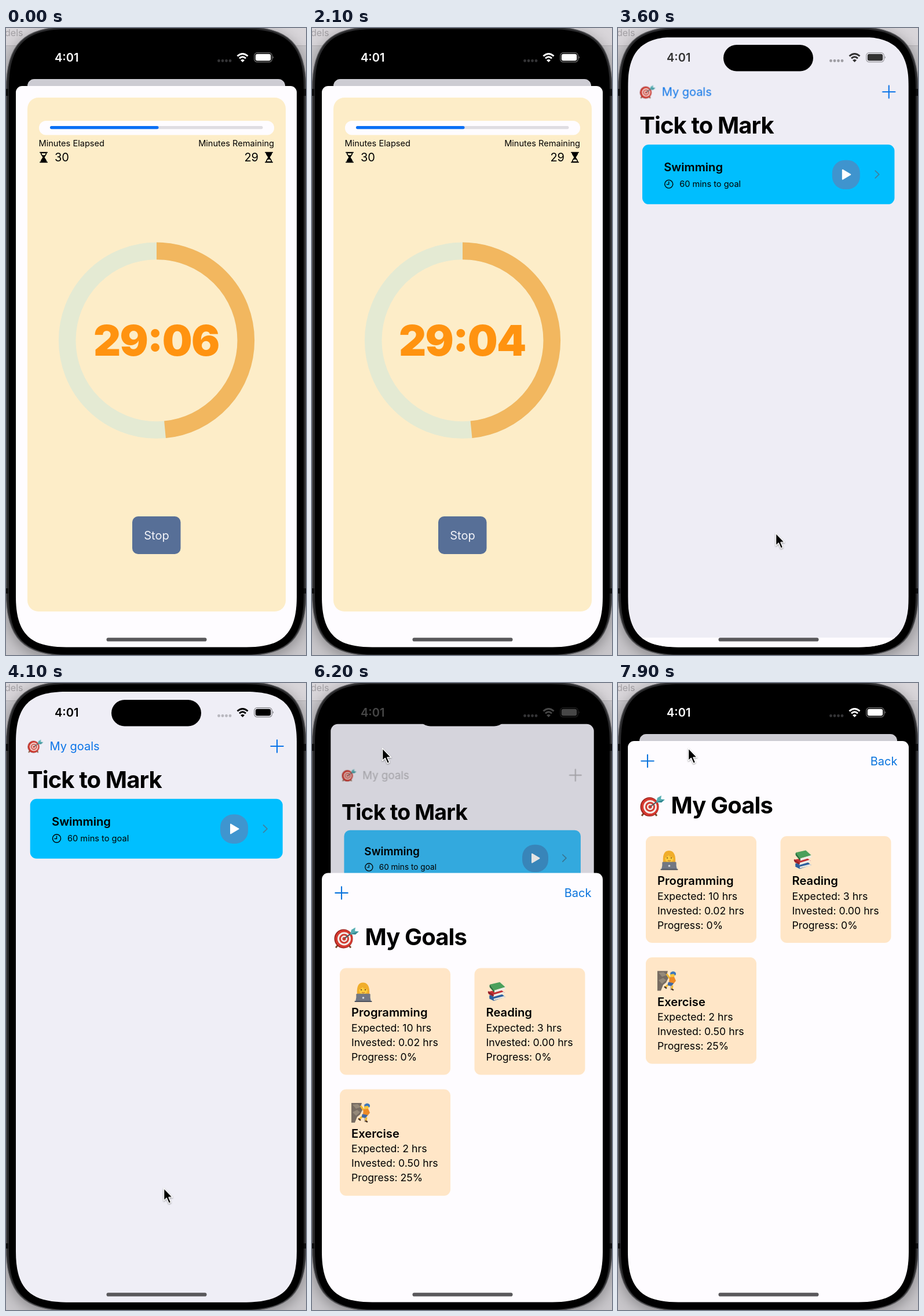
An HTML page that plays this animation: 518 px wide and 1081 px high, repeating every 8 s.

```html
<!DOCTYPE html>
<html lang="en">
<head>
<meta charset="utf-8">
<title>Goal timer</title>
<style>
/* --open: how far the sheet is up (0 to 1); --sec: last digit of the countdown */
@property --open { syntax: "<number>"; inherits: true; initial-value: 1; }
@property --sec { syntax: "<integer>"; inherits: true; initial-value: 6; }

html, body { margin: 0; width: 100%; height: 100%; overflow: hidden; background: #cfccd0; }
svg.stage {
  display: block; width: 518px; height: 1081px;
  font-family: Inter, "Liberation Sans", sans-serif;
  animation: open 8s infinite, count 8s infinite;
  /* critically damped spring for the sheet, hard steps for the digit */
  animation-timing-function:
    linear(0, .103 5%, .294 10%, .4815 15%, .6356 20%, .751 25%, .834 30%,
      .89 35%, .929 40%, .971 50%, .9928 65%, .9983 80%, 1),
    step-end;
}
@keyframes open {
  0%, 40.625% { --open: 1; }
  48.125%, 75.575% { --open: 0; }
  83.075%, 100% { --open: 1; }
}
@keyframes count {
  0% { --sec: 6; }
  8.75% { --sec: 5; }
  21.25% { --sec: 4; }
  33.75%, 100% { --sec: 3; }
}

.home {
  transform: translate(259.5px, calc(15px + 73px * var(--open)))
    scale(calc(1 - .0825 * var(--open))) translate(-259.5px, -15px);
}
.drop { transform: translateY(calc(13.5px * var(--open))); }
.dim { opacity: calc(.14 * var(--open)); }
.sheet { transform: translateY(calc(967px * (1 - var(--open)))); }

.tint { animation: tint 8s linear infinite; }
@keyframes tint {
  0%, 41% { color: #b3b2b8; }
  45%, 75.6% { color: #0a74e8; }
  77%, 100% { color: #b3b2b8; }
}
.card { animation: card 8s linear infinite; }
@keyframes card {
  0%, 41% { fill: #39bdf8; }
  45%, 75.6% { fill: #00bfff; }
  77%, 100% { fill: #39bdf8; }
}
.press { animation: press 8s step-end infinite; }
@keyframes press {
  0% { opacity: 1; }
  73.75% { opacity: .3; }
  76%, 100% { opacity: 1; }
}
.press use { animation: gray 8s step-end infinite; }
@keyframes gray {
  0% { filter: none; }
  73.75% { filter: grayscale(1) brightness(.7); }
  76%, 100% { filter: none; }
}
.status { animation: status 8s linear infinite; }
@keyframes status {
  0%, 41% { color: #fff; }
  46%, 75.6% { color: #000; }
  82.5%, 100% { color: #fff; }
}
.weak { animation: weak 8s linear infinite; }
@keyframes weak {
  0%, 41% { fill: #343436; }
  46%, 75.6% { fill: #b8b7be; }
  77%, 100% { fill: #343436; }
}
.timer { animation: first 8s step-end infinite; }
.goals { animation: second 8s step-end infinite; }
@keyframes first { 0% { visibility: visible; } 50%, 100% { visibility: hidden; } }
@keyframes second { 0% { visibility: hidden; } 50%, 100% { visibility: visible; } }

.clock text {
  font-size: 73px; font-weight: 900; letter-spacing: -.022em;
  font-feature-settings: "case" 1; fill: #ff9310; text-anchor: middle;
  opacity: calc(1 - (var(--sec) - var(--n)) * (var(--sec) - var(--n)));
}
.arc { stroke-dasharray: calc((1740 + var(--sec)) * 1px) 3600px; }

.cursor {
  filter: drop-shadow(0 1px 1px #0006);
  animation: point 8s infinite, show 8s step-end infinite;
}
@keyframes point {
  0%, 38.8% { transform: translate(271px, 869px); }
  40%, 62.5% { transform: translate(272px, 870.5px); animation-timing-function: ease-in-out; }
  72.5%, 100% { transform: translate(121px, 112px); }
}
@keyframes show { 0% { visibility: hidden; } 28.75%, 100% { visibility: visible; } }

.body-shell { filter: drop-shadow(0 6px 12px #0005); }
.big { font-size: 40px; font-weight: 700; letter-spacing: -.9px; }
.head { font-size: 20.2px; font-weight: 600; }
.body { font-size: 20px; }
.row { font-size: 17.7px; }
.small { font-size: 14.6px; }
.line { fill: none; stroke: currentColor; }
.link { color: #0a74dd; }
</style>
</head>
<body>
<svg class="stage" viewBox="0 0 518 1081">
  <defs>
    <clipPath id="screen">
      <path d="M17 102C17 39 41 15 104 15H415C478 15 502 39 502 102V980.5C502 1043.5 478 1067.5 415 1067.5H104C41 1067.5 17 1043.5 17 980.5z"/>
    </clipPath>

    <symbol id="plus" viewBox="-12 -12 24 24">
      <path class="line" d="M-10.7 0H10.7M0-10.7V10.7" stroke-width="2.1" stroke-linecap="round"/>
    </symbol>

    <symbol id="dart" viewBox="0 0 44 38">
      <path d="M7 31l-4 5M25 31l4 5" stroke="#7b4a2c" stroke-width="3"/>
      <ellipse cx="16.5" cy="20.5" rx="16" ry="16.5" fill="#8f1d1a"/>
      <ellipse cx="17" cy="20.5" rx="15" ry="15.5" fill="#d5392f"/>
      <circle cx="17.5" cy="20.5" r="11.5" fill="#f3ece8"/>
      <circle cx="17.5" cy="20.5" r="8.5" fill="#cf3a30"/>
      <circle cx="17.5" cy="20.5" r="5.6" fill="#f3ece8"/>
      <circle cx="17.5" cy="20.5" r="3" fill="#cf3a30"/>
      <path d="M18 20L34 8" stroke="#4c5a60" stroke-width="2"/>
      <path d="M28 13l2-8 7-4-1 6 7 1-6 5z" fill="#56aeb2"/>
      <path d="M29 12l13-4-5 5z" fill="#33868f"/>
    </symbol>

    <symbol id="coder" viewBox="0 0 36 36">
      <path d="M8 25C6 10 9 1 18 1s13 9 11 24z" fill="#f0ad2b"/>
      <path d="M5 34c0-8 5-11 13-11s14 3 14 11z" fill="#5a76a8"/>
      <path d="M15 20h7v5q-4 3-7 0z" fill="#e9b11f"/>
      <ellipse cx="18.5" cy="14" rx="7.5" ry="8.5" fill="#fccb3d"/>
      <path d="M10 14Q12 5 19 5q6 1 8 9-7-1-10-5-2 4-7 5z" fill="#f0ad2b"/>
      <path d="M15 13v2M22 13v2" stroke="#5b3a1d" stroke-width="1.6"/>
      <path d="M16 18.5q2.5 2 5 0" stroke="#a4552b" fill="none"/>
      <rect x="6" y="21" width="25" height="14" rx="1.5" fill="#727783"/>
      <rect x="3" y="33.5" width="31" height="2" rx="1" fill="#4c515c"/>
      <circle cx="18.5" cy="28" r="1.8" fill="#d6d9df"/>
    </symbol>

    <symbol id="books" viewBox="0 0 36 36">
      <path d="M4 25l22-3 7 6-21 7-8-4z" fill="#2c5f9d"/>
      <path d="M12 31l20-5v3l-20 5z" fill="#e9e7e0"/>
      <path d="M3 18l21-4 8 6-20 7-9-4z" fill="#c22f34"/>
      <path d="M11 24l20-6v4l-20 6z" fill="#efece4"/>
      <path d="M2 17q-2 4 2 6l8 4v-3l-8-5z" fill="#94222a"/>
      <path d="M5 5l18-4 10 9-20 6z" fill="#4ba05b"/>
      <path d="M13 16l20-6v4l-20 6z" fill="#efece4"/>
      <path d="M5 5q-2 4 1 7l7 8v-4z" fill="#2b7541"/>
    </symbol>

    <symbol id="climber" viewBox="0 0 36 36">
      <path d="M1 1h18l-2 7 3 5-4 8-5 4-4 10H1z" fill="#776c62"/>
      <path d="M3 4l9-1 5 5-8 3zM3 17l8-4 5 4-7 6z" fill="#958979"/>
      <path d="M24 3v31" stroke="#8d8a86"/>
      <path d="M17 6l5 7 4 1" fill="none" stroke="#f2b92e" stroke-width="3"/>
      <circle cx="27" cy="8" r="4" fill="#fbc638"/>
      <path d="M23 7q1-6 7-5 5 2 2 7l-3-3z" fill="#3d78bd"/>
      <path d="M22 12l8-1 3 7-5 6-7-4z" fill="#ee8a26"/>
      <path d="M20 20l9 2-3 5-8-1z" fill="#3f67a4"/>
      <path d="M19 25l-4 4M27 26l-1 6" stroke="#f2b92e" stroke-width="3"/>
      <path d="M13 28l4 3M25 32l4 2" stroke="#4b3325" stroke-width="2.5"/>
    </symbol>

    <symbol id="glass" viewBox="0 0 14 19">
      <path d="M1 1h12M1 18h12" stroke="#000" stroke-width="2" stroke-linecap="round"/>
      <path d="M2.3 1.5C2.3 6 6 7.5 6 9.5S2.3 13 2.3 17.5h9.4C11.7 13 8 11.5 8 9.5s3.7-3.5 3.7-8z" stroke="#000" stroke-width="1.5"/>
      <path d="M3.4 2.4h7.2q-.3 2-1.6 3.4H5Q3.7 4.4 3.4 2.4z" fill="#fdedc8"/>
    </symbol>
  </defs>

  <!-- desk and phone body -->
  <rect width="518" height="1081" fill="#c9c7cb"/>
  <rect width="518" height="30" fill="#d9d6da"/>
  <path d="M0 30.5H518" stroke="#b5b2b6"/>
  <text x="-2" y="14" font-size="16" fill="#a4a1a5">dels</text>
  <path class="body-shell" d="M.5 106C.5 28 30.5-2 108.5-2H410C488-2 518 28 518 106V974C518 1052 488 1082 410 1082H108.5C30.5 1082 .5 1052 .5 974z" fill="#29292b" stroke="#58585b" stroke-width="1.5"/>
  <path d="M0 105V117M0 966V975M518 105V117M518 966V975" stroke="#0d0d0e" stroke-width="8"/>
  <path d="M5 104C5 30 33 2 107 2H412C486 2 514 30 514 104V978C514 1052 486 1080 412 1080H107C33 1080 5 1052 5 978z"/>

  <g clip-path="url(#screen)">
    <rect width="518" height="1081"/>

    <g class="home">
      <rect x="17" y="15" width="485" height="1060" rx="13" fill="#efeef6"/>
      <g class="tint">
        <g class="press">
          <use href="#dart" x="37" y="97" width="28" height="24"/>
          <text class="body" x="75.5" y="116" fill="currentColor">My goals</text>
        </g>
        <use href="#plus" x="456" y="97" width="24" height="24"/>
      </g>
      <g class="drop">
        <text class="big" x="37" y="180.5">Tick to Mark</text>
        <rect class="card" x="41.7" y="199.8" width="436" height="103" rx="11"/>
        <text class="head" x="79" y="246">Swimming</text>
        <circle class="line" cx="87.5" cy="268" r="7" stroke-width="1.4"/>
        <path class="line" d="M87.5 263.5V268.5H83.5" stroke-width="1.3"/>
        <text class="small" x="106" y="273.3">60 mins to goal</text>
        <rect x="370" y="226.5" width="48" height="50.5" rx="22" fill="#3f95cf"/>
        <path d="M388 243.5L401.5 251.5 388 259.5z" fill="#fff" stroke="#fff" stroke-width="2" stroke-linejoin="round"/>
        <path d="M444.5 245l6.5 6.3-6.5 6.3" fill="none" stroke="#3f82a2" stroke-width="1.8" stroke-linecap="round" stroke-linejoin="round"/>
      </g>
      <rect class="dim" x="17" y="15" width="485" height="1060" rx="13"/>
    </g>

    <rect x="182" y="29" width="155" height="45.5" rx="22.7"/>

    <g class="status">
      <text x="84" y="58" font-size="20" font-weight="600" fill="currentColor">4:01</text>
      <g class="weak">
        <circle cx="367.5" cy="56.5" r="2.4"/><circle cx="374" cy="56.5" r="2.4"/>
        <circle cx="380.5" cy="56.5" r="2.4"/><circle cx="387" cy="56.5" r="2.4"/>
      </g>
      <g class="line" stroke-width="3">
        <path d="M399.5 48.5Q408.5 40.5 417.5 48.5M403 52.3Q408.5 47.3 414 52.3"/>
      </g>
      <path d="M405 55.5Q408.5 52.5 412 55.5L408.5 59z" fill="currentColor"/>
      <rect class="line" x="428.7" y="42.7" width="30.6" height="16" rx="5" stroke-width="1.2" stroke-opacity=".45"/>
      <rect x="430.8" y="44.8" width="26.4" height="11.8" rx="3.3" fill="currentColor"/>
      <path d="M460.7 48.3q2.6 2.4 0 4.8z" fill="currentColor" fill-opacity=".5"/>
    </g>

    <g class="sheet">
      <rect x="17" y="100" width="485" height="1000" rx="11" fill="#fefcff"/>

      <g class="timer">
        <rect x="37" y="120" width="446" height="886" rx="19" fill="#fdedc8"/>
        <rect x="57" y="160" width="406" height="24.5" rx="12" fill="#fefcff"/>
        <rect x="76" y="169" width="367.5" height="5.2" rx="2.6" fill="#dfdde2"/>
        <rect x="76" y="169" width="187.5" height="5.2" rx="2.6" fill="#0a70f5"/>
        <text class="small" x="56.5" y="204">Minutes Elapsed</text>
        <text class="small" x="463" y="204" text-anchor="end">Minutes Remaining</text>
        <use href="#glass" x="58" y="213.5" width="14" height="19"/>
        <text class="body" x="84" y="230.3">30</text>
        <text class="body" x="436" y="230.3" text-anchor="end">29</text>
        <use href="#glass" width="14" height="19" transform="translate(461 232.5) rotate(180)"/>

        <g fill="none" stroke-width="29.6">
          <circle cx="260" cy="538.7" r="154.3" stroke="#e4ead3"/>
          <circle class="arc" cx="260" cy="538.7" r="154.3" stroke="#f2b75f" pathLength="3600" transform="rotate(-90 260 538.7)"/>
        </g>
        <g class="clock">
          <text x="259.3" y="565" style="--n:6">29:06</text>
          <text x="259.3" y="565" style="--n:5">29:05</text>
          <text x="259.3" y="565" style="--n:4">29:04</text>
          <text x="259.3" y="565" style="--n:3">29:03</text>
        </g>

        <rect x="218" y="842" width="83.5" height="65" rx="10" fill="#576f97"/>
        <text class="body" x="260" y="882" fill="#f3f4f9" text-anchor="middle">Stop</text>
      </g>

      <g class="goals">
        <g class="link">
          <use href="#plus" x="39" y="122.5" width="24" height="24"/>
          <text class="body" x="482.5" y="142" fill="currentColor" text-anchor="end">Back</text>
        </g>
        <use href="#dart" x="38" y="193" width="44" height="38"/>
        <text class="big" x="91.5" y="224.5">My Goals</text>

        <g transform="translate(48 264)">
          <rect width="191" height="184" rx="11" fill="#ffe6c7"/>
          <use href="#coder" x="22" y="24" width="36" height="35"/>
          <text class="head" x="20" y="84">Programming</text>
          <text class="row" x="20" y="109.5">Expected: 10 hrs</text>
          <text class="row" x="20" y="134.5">Invested: 0.02 hrs</text>
          <text class="row" x="20" y="159.5">Progress: 0%</text>
        </g>
        <g transform="translate(280.5 264)">
          <rect width="191" height="184" rx="11" fill="#ffe6c7"/>
          <use href="#books" x="21" y="23.5" width="36" height="34"/>
          <text class="head" x="20" y="84">Reading</text>
          <text class="row" x="20" y="109.5">Expected: 3 hrs</text>
          <text class="row" x="20" y="134.5">Invested: 0.00 hrs</text>
          <text class="row" x="20" y="159.5">Progress: 0%</text>
        </g>
        <g transform="translate(48 473)">
          <rect width="191" height="183.5" rx="11" fill="#ffe6c7"/>
          <use href="#climber" x="19" y="22.5" width="36" height="36"/>
          <text class="head" x="20" y="83.5">Exercise</text>
          <text class="row" x="20" y="109">Expected: 2 hrs</text>
          <text class="row" x="20" y="134">Invested: 0.50 hrs</text>
          <text class="row" x="20" y="159">Progress: 25%</text>
        </g>
      </g>
    </g>

    <rect x="173.5" y="1051.3" width="173" height="6.2" rx="3.1" fill="#59585b"/>
  </g>

  <g class="cursor">
    <path d="M.5.5V22L5.3 17.6 9.2 26.6 12.8 25 9 16.2H15.6z" stroke="#fff" stroke-width="1.5" stroke-linejoin="round"/>
  </g>
</svg>
</body>
</html>
```
